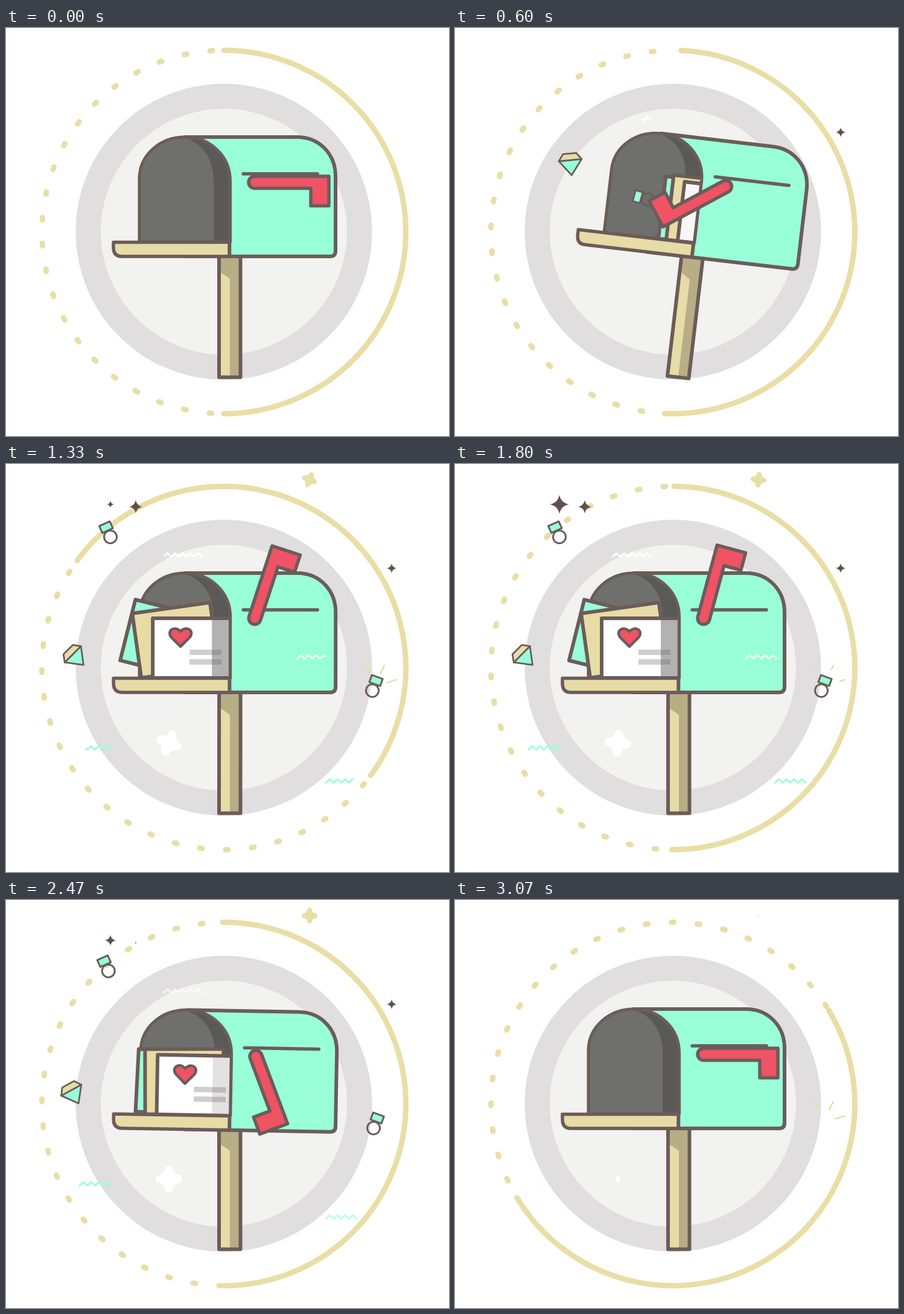
These frames come from a looping animation (734x677 px, 3.14 s). An HTML page with a canvas:

```html
<!DOCTYPE html>
<html lang="en">
<head>
<meta charset="utf-8">
<title>Mailbox</title>
<style>
html, body { margin: 0; width: 100%; height: 100%; overflow: hidden; background: #fff; }
canvas { display: block; }
</style>
</head>
<body>
<canvas id="stage" width="734" height="677"></canvas>
<script>
const LOOP = 3140, IMPACT = 500, RAD = Math.PI / 180;
const BROWN = '#6b5c5a', MINT = '#98ffd8', TAN = '#e7dca5', RED = '#ef5364', GOLD = '#e9dea6';
const c = document.getElementById('stage').getContext('2d');
let now = 0;

// Timing: share of the span from a to b that has passed, and easings of it
const ramp = (a, b) => Math.min(1, Math.max(0, (now - a) / (b - a)));
const swell = (a, b, from, to) => ramp(a, b) * (1 - ramp(from, to));
const smooth = u => u * u * (3 - 2 * u);
const cubicOut = u => 1 - (1 - u) ** 3;
const backIn = u => u * u * (2.7 * u - 1.7);
const backOut = u => 1 - backIn(1 - u);

// Same as cubic-bezier(.23, 0, .235, 1)
function swift(u) {
  let lo = 0, hi = 1, s = 0.5;
  for (let i = 0; i < 20; i++) {
    s = (lo + hi) / 2;
    const x = 3 * s * (1 - s) * (0.23 * (1 - s) + 0.235 * s) + s ** 3;
    if (x < u) lo = s; else hi = s;
  }
  return smooth(s);
}

// A blow that peaks 100 ms after it starts and dies away
function knock(start, peak) {
  const u = Math.max(0, (now - start) / 100);
  return peak * u * Math.exp(1 - u);
}

function at(x, y, deg, scale, draw) {
  c.save();
  c.translate(x, y);
  c.rotate(deg * RAD);
  c.scale(scale, scale);
  draw();
  c.restore();
}

function shape(d, fill, width = 6, stroke = BROWN) {
  const p = new Path2D(d);
  if (fill) { c.fillStyle = fill; c.fill(p); }
  if (width) { c.lineWidth = width; c.strokeStyle = stroke; c.stroke(p); }
}

function disc(r, color) {
  c.fillStyle = color;
  c.beginPath();
  c.arc(361, 338, r, 0, 7);
  c.fill();
}

function goldArc(from, to) {
  c.lineWidth = 9;
  c.strokeStyle = GOLD;
  c.beginPath();
  c.arc(361, 338.5, 301.5, (from - 90) * RAD, (to - 90) * RAD);
  c.stroke();
}

// Half a ring runs round; dots at their own speed fill the other half
function dial() {
  const gap = 360 / 44, wind = swift(ramp(0, 2007)), unwind = ramp(2400, LOOP) ** 1.8;
  const turn = 725 * wind - 365 * unwind;
  const dots = 4.2 + 306 * wind + 127.6 * unwind;
  goldArc(turn, turn + 180);
  for (let i = 0; i < 44; i++) {
    const a = dots + i * gap, rel = ((a - turn) % 360 + 360) % 360;
    if (rel > 181.5 && rel < 358.5) goldArc(a - 0.4, a + 0.4);
  }
}

// Part of a path, from share a to share b of its length
function trim(d, length, a, b, width, color) {
  if (b - a < 0.01) return;
  c.setLineDash([(b - a) * length, 2000]);
  c.lineDashOffset = -a * length;
  shape(d, null, width, color);
  c.setLineDash([]);
}

function trails() {
  const line = (d, length) => trim(d, length, ramp(880, 1060), ramp(680, 850), 5, '#a59d9a');
  line('M206 322C130 315 60 210 138 131', 245);
  line('M440 531Q540 505 584 409', 195);
  line('M305 565C245 565 205 530 194 479', 150);
  line('M165 287L170 282', 8);
}

function rays(start) {
  for (const d of ['M603 349L596 334', 'M620 348L627 334', 'M631 363L646 358'])
    trim(d, 16, ramp(start + 150, start + 1050), ramp(start, start + 130), 2.5, GOLD);
}

function wave(x, y, dir, count, color, start, fade) {
  const end = cubicOut(ramp(start, start + 1200)) * count * 2;
  const level = i => i % 2 ? -3 : 3;
  if (!end) return;
  c.save();
  c.globalAlpha = 1 - ramp(fade, fade + 550);
  c.lineWidth = 3;
  c.strokeStyle = color;
  c.beginPath();
  c.moveTo(x, y + 3);
  for (let i = 1; i <= end; i++) c.lineTo(x + dir * i * 6.4, y + level(i));
  const f = Math.floor(end);
  c.lineTo(x + dir * end * 6.4, y + level(f) + (level(f + 1) - level(f)) * (end - f));
  c.stroke();
  c.restore();
}

function sparkle(x, y, size) {
  at(x, y, 0, size / 10, () =>
    shape('M0-10Q1.5-1.5 10 0Q1.5 1.5 0 10Q-1.5 1.5-10 0Q-1.5-1.5 0-10Z', '#5f504e', 0));
}

function blossom(x, y, size, color) {
  at(x, y, 45 * (1 - ramp(600, 2000)), size / 22, () =>
    shape('M0-15Q2-2 15 0Q2 2 0 15Q-2 2-15 0Q-2-2 0-15Z', color, 14, color));
}

function stars() {
  sparkle(639, 173, 8 * swell(540, 600, 2700, 2900));
  sparkle(215, 71, 11 * swell(1050, 1330, 2000, 2550));
  sparkle(173, 67, 16 * swell(1130, 1700, 2250, 2750));
  blossom(503, 26, 13 * swell(780, 920, 2700, 3120), GOLD);
  blossom(270, 463, 22 * swell(780, 1030, 2880, LOOP), '#fff');
}

function drawRing() {
  shape('M-10.5 0A10.5 10.5 0 1 1 10.5 0A10.5 10.5 0 1 1-10.5 0Z', null, 3);
  shape('M-9.5-24H9.5V-11.5H-9.5Z', MINT, 3);
}

function drawDiamond() {
  shape('M-19-6L0 19L19-6Z', MINT, 2.8);
  shape('M-19-6L-11-17H11L19-6Z', TAN, 2.8);
}

// Flies out of the box along a bend, later swings back and is pulled straight in
function fly(gem) {
  const { home, bend, rest, start, end, angles } = gem;
  const u = swift(ramp(start, end)), back = ramp(2400, 3000), w = 1 - u;
  const scale = Math.min(ramp(start, start + 60), 5 * (1 - back), 1);
  if (!scale) return;
  const [x, y] = home.map((h, i) =>
    w * w * h + 2 * u * w * bend[i] + u * u * rest[i] + (h - rest[i]) * backIn(back));
  at(x, y, angles[0] * w + angles[1] * u + (gem.spin || 0) * back, scale, gem.draw);
}

const diamond = { home: [320, 280], bend: [168, 150], rest: [115, 320], start: 480, end: 880,
  angles: [35, -45], spin: 138, draw: drawDiamond };
const leftRing = { home: [345, 290], bend: [72, 235], rest: [173, 121], start: 542, end: 1262,
  angles: [-77, -24], draw: drawRing };
const rightRing = { home: [500, 250], bend: [547, 714], rest: [607, 376], start: 600, end: 1262,
  angles: [90, 20], draw: drawRing };

function tilt(x, y, deg) {
  c.translate(x, y);
  c.rotate(deg * RAD);
  c.translate(-x, -y);
}

function onPost(draw) {
  c.save();
  tilt(370, 570, knock(IMPACT, 6.7));
  draw();
  c.restore();
}

function onBox(draw) {
  onPost(() => {
    tilt(205, 375, knock(2100, 4));
    draw();
  });
}

function post() {
  shape('M353 376H388.5V579.5H353Z', TAN, 0);
  shape('M353 376H388.5V579.5H371V416L353 404Z', '#b7ae85', 0);
  shape('M353 376H388.5V579.5H353Z', null);
}

function boxBack() {
  const mouth = 'M221 355V250C221 210 256 181 296 181C338 181 371.5 212 371.5 254V355Z';
  shape('M296 181H482C520 181 546 210 546 246V370Q546 379 537 379H296Z', MINT);
  shape(mouth, '#5a5957', 0);
  shape('M221 355V250C221 210 256 181 290 181C322 187 344 215 344 252V355Z', '#6f706d', 0);
  shape(mouth, null, 5);
}

function cards() {
  const x = -190 + 565 * ramp(180, IMPACT) - 132 * swift(ramp(523, 951)) + 180 * ramp(2350, 3000) ** 2;
  const fan = swift(ramp(580, 1100)) * (1 - smooth(ramp(2050, 2600)));
  if (x > 410) return;
  c.save();
  c.beginPath();
  c.rect(-900, 100, 1271, 400);
  c.clip();
  at(x - 32 - 22 * fan, 355 - 29 * fan, 14 * fan, 1, () => shape('M0 0V-104H130V0Z', MINT));
  at(x - 19, 355, -8 * fan, 1, () => shape('M0 0V-108H130V0Z', TAN));
  at(x, 355, 0, 1, () => {
    shape('M0 0V-99H130V0Z', '#fff');
    shape('M61-47H114V-38H61ZM61-31H114V-22H61Z', '#d0cecf', 0);
  });
  c.fillStyle = `rgba(105, 98, 100, ${0.5 * Math.sqrt(fan)})`;
  c.fillRect(341, 259, 30, 93);
  at(x + 46, 288, 0, 1, () =>
    shape('M0 15L-15 0C-24-11-10-21 0-10C10-21 24-11 15 0Z', RED, 4.5));
  c.restore();
}

function boxFront() {
  shape('M371 252V379', null, 4.5);
  shape('M178 355.5H370V379H192Q178 379 178 364Z', TAN, 5.5);
  shape('M393 242H516', null, 5.5);
  const swing = 285 * (backOut(ramp(480, 1410)) - swift(ramp(1951, 3062)));
  at(412, 256, swing, 1, () =>
    shape('M0-10H123V39H93V10H0A10 10 0 0 1 0-10Z', RED, 5.5));
}

function frame(time) {
  now = time % LOOP;
  c.fillStyle = '#fff';
  c.fillRect(0, 0, 734, 677);
  c.lineCap = c.lineJoin = 'round';
  disc(245.5, '#e0dedf');
  disc(204, '#f2f2f0');
  dial();
  trails();
  fly(rightRing);
  onPost(post);
  onBox(boxBack);
  fly(leftRing);
  fly(diamond);
  onBox(() => { cards(); boxFront(); });
  wave(325, 151, -1, 5, '#fff', 500, 2320);
  wave(482, 320, 1, 4, '#effff8', 620, 1980);
  wave(173, 471, -1, 4, MINT, 850, 2560);
  wave(530, 526, 1, 4, MINT, 735, 2290);
  stars();
  rays(1200);
  rays(2950);
}

const start = performance.now();
function loop() {
  frame(performance.now() - start);
  requestAnimationFrame(loop);
}
loop();
</script>
</body>
</html>
```
